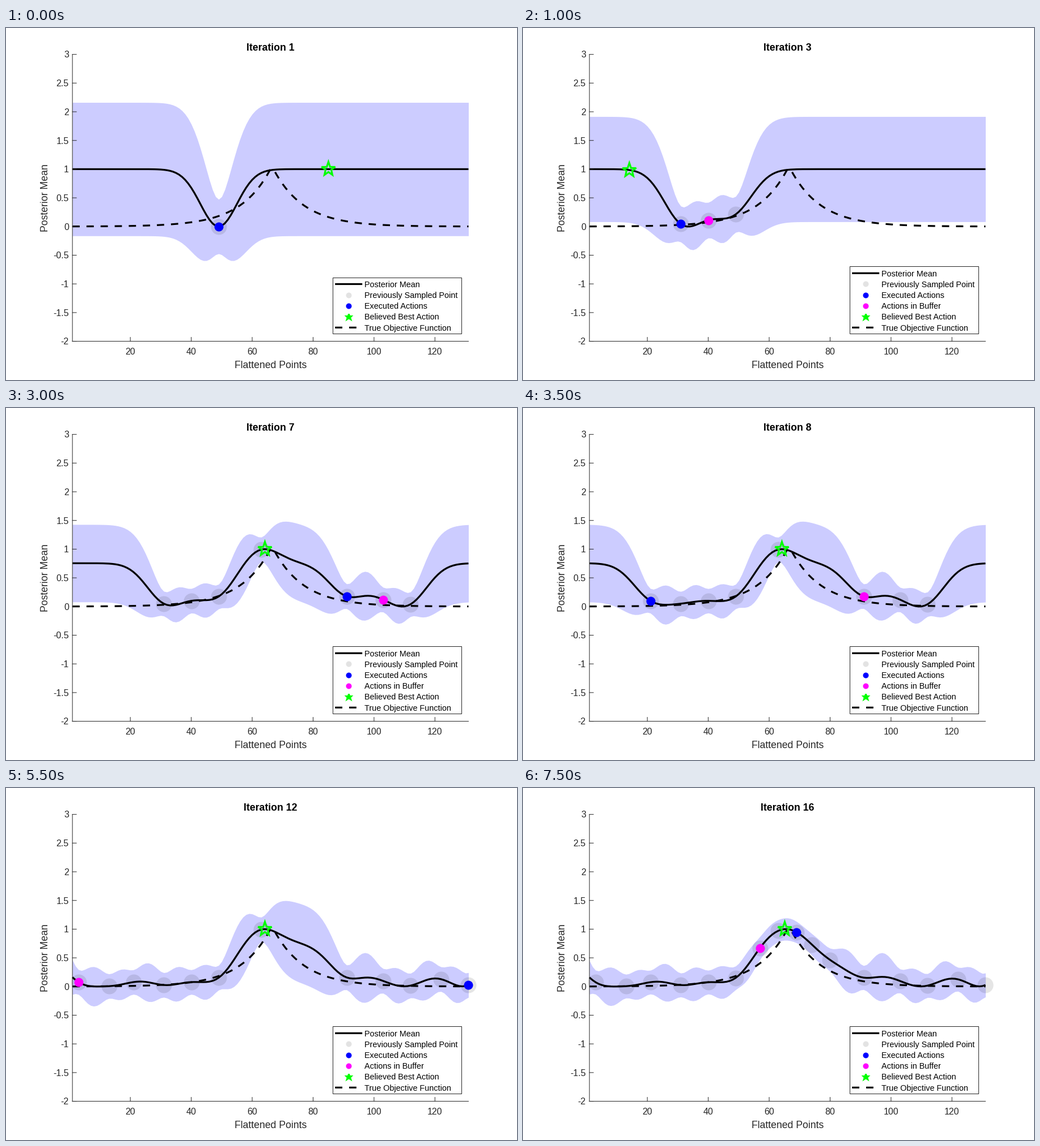
A matplotlib script for the animation above (8000 ms loop, 901 by 622 pixels).

```python
import numpy as np
import matplotlib.pyplot as plt
from matplotlib.animation import FuncAnimation
from matplotlib.markers import MarkerStyle
from matplotlib.patches import Rectangle

W, H = 901, 622
DPI = 72  # one point equals one pixel
plt.rcParams["font.family"] = "Liberation Sans"
plt.rcParams["lines.scale_dashes"] = False

INK = "#262626"
BAND, GREEN = "#ccccff", "#00ff00"
LINE_W = 3.2
DASH = (0, (12.8, 12.03))
LEFT, RIGHT = 0.13 * W, 0.905 * W
TOP, BOTTOM = 0.075 * H, 0.89 * H
MID_X, MID_Y = (LEFT + RIGHT) / 2, (TOP + BOTTOM) / 2

# Gaussian process: kernel length, prior mean and prior deviation
LENGTH, PRIOR, SIGMA = 6.0, 0.74, 0.68
X = np.arange(1, 132)
TRUTH = np.exp(-0.1 * (np.abs(X - 66.5) - 0.5))

# Executed actions in order, each with its learned utility
SAMPLES = [(49, 0.155), (40, 0.08), (31, 0.03), (63, 0.98), (112, 0.02), (103, 0.1),
           (91, 0.16), (21, 0.08), (13, 0.01), (122, 0.13), (3, 0.08), (131, 0.03),
           (80, 0.47), (74, 0.74), (57, 0.68), (69, 0.955)]
# Arbitrary best actions while the maximum is still a plateau
PLATEAU = [85, 66, 14]


def px(x):
    return LEFT + (np.asarray(x) - 1) * (RIGHT - LEFT) / 130


def py(y):
    return TOP + (3 - np.asarray(y)) * (BOTTOM - TOP) / 5


def kernel(a, b):
    return np.exp(-np.subtract.outer(a, b) ** 2 / (2 * LENGTH ** 2))


def posterior(i):
    """Sampled points, mean scaled to 0..1 and half band width."""
    pts, util = (np.array(v) for v in zip(*SAMPLES[:i + 1]))
    gram, cross = kernel(pts, pts), kernel(X, pts)
    eye = np.eye(len(pts))
    mean = PRIOR + cross @ np.linalg.solve(gram + 1e-6 * eye, util - PRIOR)

    noise = 0.1 + 0.1 / (i + 1)
    gain = np.linalg.solve(gram + noise * eye, cross.T)
    sd = SIGMA * np.sqrt(1 - np.sum(cross * gain.T, axis=1))
    span = np.ptp(mean)
    return pts, (mean - mean.min()) / span, sd / span


fig = plt.figure(figsize=((W + 0.001) / DPI, (H + 0.001) / DPI), dpi=DPI, facecolor="white")
ax = fig.add_axes([0, 0, 1, 1])


def label(x, y, s, size, color=INK, **kw):
    ax.text(x, y, s, fontsize=size, color=color, va="baseline", zorder=12, **kw)


def dot(x, y, r, color, z, alpha=1):
    ax.plot(x, y, "o", ms=2 * r, mfc=color, mec="none", alpha=alpha, zorder=z, snap=False)


def star(x, y, r, fill, z):
    ax.plot(x, y, marker=MarkerStyle("*", joinstyle="miter"), ms=2 * r, mfc=fill,
            mec=GREEN, mew=LINE_W, zorder=z, snap=False)


def stroke(x, y, z, dash="-"):
    ax.plot(x, y, color="black", lw=LINE_W, ls=dash, zorder=z, snap=False,
            solid_capstyle="butt", dash_capstyle="butt")


def thin(x, y):
    ax.plot(x, y, color=INK, lw=1, zorder=5, snap=False, solid_capstyle="projecting")


def draw_axes(i):
    thin([LEFT, LEFT], [TOP, BOTTOM])
    thin([LEFT, RIGHT], [BOTTOM, BOTTOM])
    for v in range(20, 121, 20):
        x = px(v)
        thin([x, x], [BOTTOM, BOTTOM - 7])
        label(x, 577, str(v), 16, ha="center")
    for v in np.arange(-2, 3.1, 0.5):
        y = py(v)
        thin([LEFT, LEFT + 7], [y, y])
        label(LEFT - 6.3, y + 5.8, f"{v:g}", 16, ha="right")
    label(MID_X, 39.5, f"Iteration {i + 1}", 17.6, "black", ha="center", weight="bold")
    label(MID_X, 600.5, "Flattened Points", 17.6, ha="center")
    label(73.5, MID_Y, "Posterior Mean", 17.6, ha="center", rotation=90,
          rotation_mode="anchor")


def draw_legend(buffered):
    rows = ["Posterior Mean", "Previously Sampled Point", "Executed Actions",
            "Actions in Buffer", "Believed Best Action", "True Objective Function"]
    if not buffered:
        rows.remove("Actions in Buffer")
    bottom, step = 540.5, 19.2
    height = step * len(rows) + 3.8
    ax.add_patch(Rectangle((575.5, bottom - height), 227, height, fc="white", ec=INK,
                           lw=1, zorder=10))
    dots = {"Previously Sampled Point": "#e3e3e3", "Executed Actions": "blue",
            "Actions in Buffer": "magenta"}
    for k, name in enumerate(reversed(rows)):
        y = 529.3 - step * k
        if name in dots:
            dot(604.2, y, 5, dots[name], 12)
        elif name == "Believed Best Action":
            star(604.2, y, 4.6, GREEN, 12)
        else:
            stroke([580.2, 628.2], [y, y], 12, DASH if name.startswith("True") else "-")
        label(632.2, y + 5.2, name, 14.4, "black")


def draw(i):
    ax.cla()
    ax.set(xlim=(0, W), ylim=(H, 0))
    ax.axis("off")

    pts, mean, half = posterior(i)
    ax.fill_between(px(X), py(mean + half), py(mean - half), color=BAND, lw=0, zorder=1)
    for p in pts:
        dot(px(p), py(mean[p - 1]), 14, "black", 2, 0.1)
    stroke(px(X), py(mean), 3)
    stroke(px(X), py(TRUTH), 4, DASH)
    draw_axes(i)

    for p, color in zip(pts[::-1], ["blue", "magenta"]):
        dot(px(p), py(mean[p - 1]), 8, color, 7)
    best = PLATEAU[i] if i < len(PLATEAU) else X[np.argmax(mean)]
    star(px(best), py(mean[best - 1]), 12.6, "none", 8)
    draw_legend(buffered=i > 0)
    return []


anim = FuncAnimation(fig, draw, frames=len(SAMPLES), interval=500, repeat=True,
                     repeat_delay=0, blit=False)
plt.show()
```
